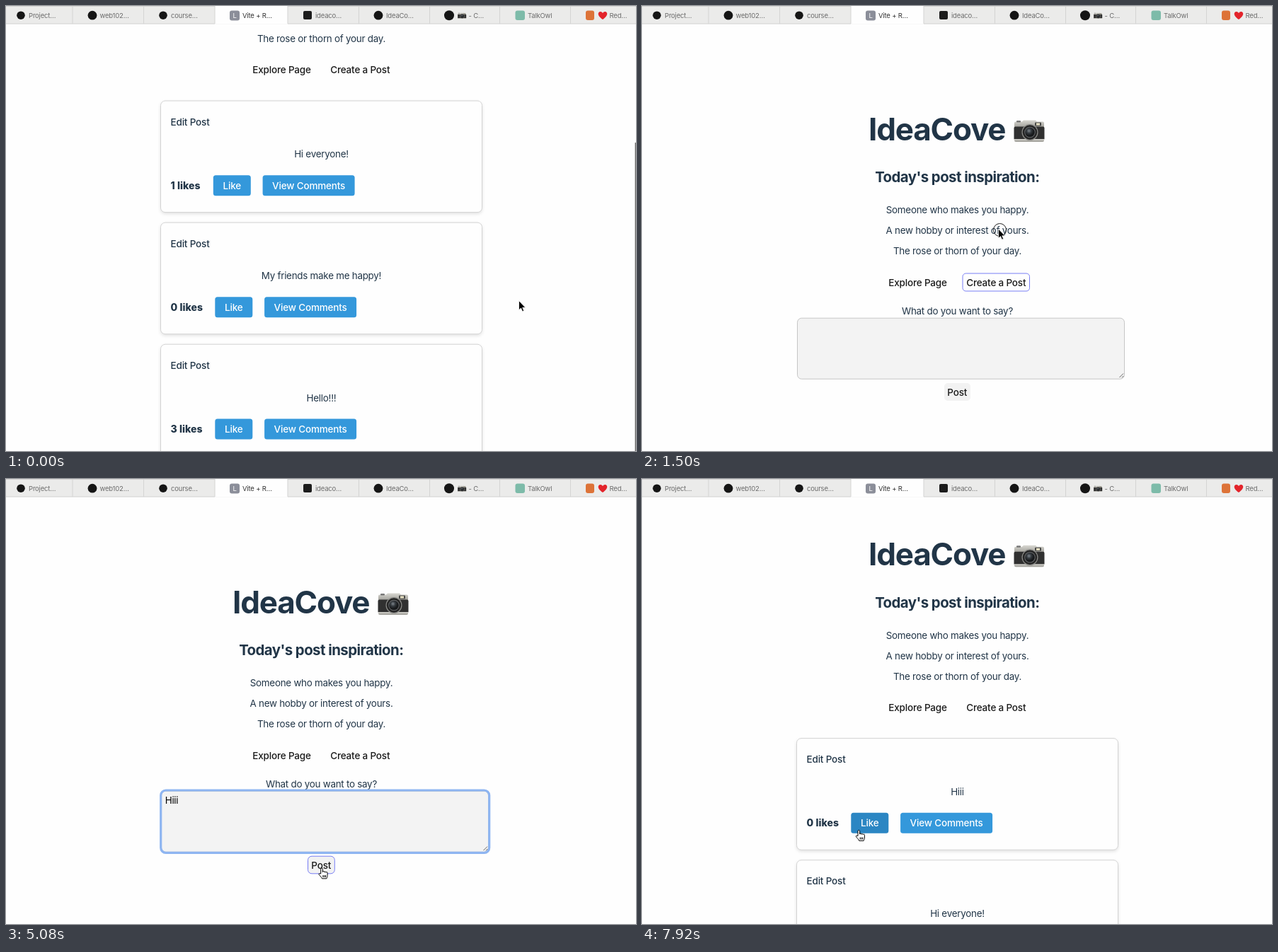
Recreate the animation shown at these times as an HTML page. Size 890x629 px, loop 8000 ms.

```html
<!DOCTYPE html>
<html lang="en">
<head>
<meta charset="utf-8">
<title>Post board</title>
<style>
  html, body { margin: 0; width: 100%; height: 100%; overflow: hidden; background: #fefefe; }
  svg { display: block; width: 890px; height: 629px; }
  text { font: 400 13.4px Inter, "Liberation Sans", sans-serif; font-optical-sizing: none;
         letter-spacing: -.019em; fill: #213547; white-space: pre; }
  .mid { text-anchor: middle; }
  .h1 { font-size: 44px; font-weight: 700; letter-spacing: -.027em; }
  .h2 { font-size: 20.4px; font-weight: 700; letter-spacing: -.027em; }
  .btn { font-size: 13.5px; font-weight: 500; letter-spacing: -.013em; }
  .likes { font-size: 14px; font-weight: 800; letter-spacing: .006em; }
  .tab { font-size: 9.5px; letter-spacing: -.02em; fill: #6c6c6c; }
  .dark { fill: #1a1a1a; }
  .white { fill: #fff; }
  .card { fill: #fefefe; stroke: #d3d3d3; filter: drop-shadow(0 2px 2px rgba(0, 0, 0, .11)); }
  .blue { fill: #3498db; }
  .blue.hover { fill: #2b86c3; }
  .outline { fill: none; stroke: #777df4; }
</style>
</head>
<body>
<svg viewBox="0 0 890 629">
  <defs>
    <linearGradient id="steel" x2="0" y2="1">
      <stop offset="0" stop-color="#d8d7d1"/><stop offset="1" stop-color="#96958f"/>
    </linearGradient>
    <radialGradient id="glass" cx=".4" cy=".35">
      <stop offset="0" stop-color="#7d858c"/><stop offset=".5" stop-color="#34393e"/><stop offset="1" stop-color="#17191b"/>
    </radialGradient>
    <g id="camera">
      <path d="M1 5q0-2 2-2h9l2-2h17l2 2h8q2 0 2 2v8H1z" fill="url(#steel)"/>
      <rect x="4" y="1.5" width="6" height="2.5" rx="1" fill="#777"/>
      <rect x="30" y="4" width="9" height="5" rx="1" fill="#4a4a48"/>
      <rect x="32" y="5" width="5" height="3" fill="#e8e2c4"/>
      <rect x=".5" y="10" width="43" height="19" rx="2" fill="#303030"/>
      <path d="M1 27.5h42v2q0 2-2 2H3q-2 0-2-2z" fill="url(#steel)"/>
      <circle cx="23" cy="18" r="11.5" fill="#8b8b88"/>
      <circle cx="23" cy="18" r="10.3" fill="#242424"/>
      <circle cx="23" cy="18" r="7.8" fill="#66686a"/>
      <circle cx="23" cy="18" r="6.8" fill="url(#glass)"/>
    </g>
  </defs>

  <rect width="890" height="629" fill="#fefefe"/>

  <g id="head">
    <text class="h1" x="320" y="122.3">IdeaCove</text>
    <use href="#camera" x="525" y="92.8"/>
    <text class="h2 mid" x="445.3" y="181.5">Today's post inspiration:</text>
    <text class="mid" x="445.5" y="225.7">Someone who makes you happy.</text>
    <text class="mid" x="445.5" y="254.7">A new hobby or interest of yours.</text>
    <text class="mid" x="445.5" y="283.7">The rose or thorn of your day.</text>
    <text class="btn dark mid" x="389.5" y="328">Explore Page</text>
    <text class="btn dark mid" x="500.3" y="328">Create a Post</text>
    <rect id="navRing" class="outline" x="453" y="310.3" width="94.5" height="25" rx="4.5"/>
  </g>

  <g id="feed"></g>

  <g id="form">
    <text class="mid" x="445.5" y="435.6">What do you want to say?</text>
    <rect x="219.5" y="441.2" width="462" height="86" rx="6" fill="#f3f3f3" stroke="#c6c6c6"/>
    <rect id="focus" x="218.7" y="440" width="464" height="88.3" rx="7" fill="none" stroke="#8eb5f1" stroke-width="3.2"/>
    <path d="M674.5 525l5.5-5.5M678 525.3l2.3-2.3" stroke="#555" stroke-width=".9"/>
    <text id="typed" x="224.7" y="458.8" style="fill:#000"></text>
    <path id="spell" d="M225.5 461h19" stroke="#e8453c" stroke-width="1.2" stroke-dasharray="1.5 1.1"/>
    <rect id="caret" y="446.5" width="1" height="14.5"/>
    <rect x="427" y="533" width="37" height="25" rx="5" fill="#f2f2f2"/>
    <rect id="postRing" class="outline" x="426.5" y="533.2" width="37.8" height="24.6" rx="5.5"/>
    <text class="btn dark mid" x="445.3" y="550.7">Post</text>
  </g>

  <rect id="thumb" x="888.6" width="1.4" height="437" fill="#6a6a6a"/>

  <g id="tabs">
    <rect width="890" height="25.5" fill="#ebebea"/>
    <rect x="295" width="103" height="25.5" fill="#fefefe"/>
    <path d="M0 .5h295M398 .5h492M0 25h295M398 25h492" stroke="#d4d4d3"/>
    <rect x="316" y="6.5" width="14" height="14" rx="3" fill="#8b8e99"/>
    <text class="tab mid white" x="323" y="17">L</text>
    <rect x="420" y="7" width="12" height="12" rx="2" fill="#1c1c1c"/>
    <rect x="719.5" y="6.5" width="13.5" height="13.5" rx="3" fill="#7dbba9"/>
    <rect x="819" y="6.5" width="12" height="13.5" rx="3" fill="#dd7338"/>
    <use href="#camera" transform="translate(638 9.3) scale(.28)"/>
    <path d="M843 19c-9-6-6.5-11-3.3-11q2.3 0 3.3 2 1-2 3.3-2c3.2 0 5.7 5-3.3 11z" fill="#e3242b"/>
  </g>

  <circle id="click" cx="505.5" cy="316.5" r="9" fill="none" stroke="#222"/>
  <path id="arrow" d="M0 0V13.3L3 10.5 5 15.2 7.2 14.3 5.2 9.8H9.3Z" stroke="#fff" stroke-width=".8"/>
  <g id="hand">
    <path transform="translate(-4.8 -1)" fill="#fff" stroke="#000" stroke-linejoin="round"
      d="M3.5 9V2.2a1.3 1.3 0 0 1 2.6 0V6.5a1.2 1.2 0 0 1 2.4.3 1.2 1.2 0 0 1 2.3.4 1.1 1.1 0 0 1 2.1.6V11.5c0 2-.8 2.8-1.2 4.3H5.2C4.6 13.8 2.6 12.3 1 10.2c-.8-1.2.6-2.2 1.6-1.4zM6.7 11v3M8.6 11v3M10.4 11v3"/>
  </g>
</svg>

<script>
const LOOP = 8000, STEP = 149.3;
const $ = id => document.getElementById(id);

function add(parent, tag, attrs, text) {
  const el = document.createElementNS('http://www.w3.org/2000/svg', tag);
  for (const key in attrs) el.setAttribute(key, attrs[key]);
  if (text) el.textContent = text;
  parent.append(el);
  return el;
}

// Tab bar
for (const x of [94, 194.5, 295, 398, 498.5, 598.5, 697.5, 797.5])
  add($('tabs'), 'path', { d: `M${x} 0v25`, stroke: '#d4d4d3' });
for (const [x, r] of [[21, 5.8], [122, 6.4], [222, 5.8], [526, 6.4], [626, 7]])
  add($('tabs'), 'circle', { cx: x, cy: 13.2, r, fill: '#151515' });
for (const [x, label] of [[32, 'Project…'], [132.5, 'web102…'], [233, 'course…'], [334, 'Vite + R…'],
    [437, 'ideaco…'], [537, 'IdeaCo…'], [653.5, '- C…'], [737, 'TalkOwl'], [852.5, 'Red…']])
  add($('tabs'), 'text', { class: 'tab', x, y: 16.7, style: x === 334 ? 'fill:#333' : '' }, label);

// Post cards; the newest sits one slot above the others
const cards = [['Hiii', 0], ['Hi everyone!', 1], ['My friends make me happy!', 0], ['Hello!!!', 3]]
  .map(([message, likes], i) => {
    const card = add($('feed'), 'g', { transform: `translate(0 ${366.6 + (i - 1) * 172.1})` });
    const x = likes === 1 ? 292.8 : 295.3;
    const button = (left, width, label) => {
      const rect = add(card, 'rect', { class: 'blue', x: left, y: 105.2, width, height: 29, rx: 3.5 });
      add(card, 'text', { class: 'btn white mid', x: left + width / 2, y: 124.8 }, label);
      return rect;
    };
    add(card, 'rect', { class: 'card', x: 218.5, y: 0, width: 454, height: 157.6, rx: 6.5 });
    add(card, 'text', { class: 'btn', x: 232.5, y: 34.6 }, 'Edit Post');
    add(card, 'text', { class: 'mid', x: 445.5, y: 80.4 }, message);
    add(card, 'text', { class: 'likes', x: 232.5, y: 124.9 }, likes + ' likes');
    return { card, like: button(x, 53, 'Like'), view: button(x + 69.8, 130, 'View Comments') };
  });

// Pointer tip: step, x, y
const path = [[0, 724.5, 416.5], [4, 662, 394.5], [7, 503.5, 315], [10, 503.5, 315], [16, 446.3, 453.5],
  [31, 446.3, 453.5], [34, 446, 550], [39, 446, 552], [40, 518.3, 486.5], [45, 556, 471.5],
  [50, 556, 471.5], [53, 306.3, 496.5]];
const scrolls = [232.6, 205, 135, 50, -1.8, -1, -.4, 0];

function pointer(n) {
  const i = Math.max(1, path.findIndex(p => p[0] >= n));
  const [a, ax, ay] = path[i - 1], [b, bx, by] = path[i];
  const k = (n - a) / (b - a);
  return [ax + (bx - ax) * k, ay + (by - ay) * k];
}

const within = (n, from, to) => n >= from && n < to;
const show = (el, on) => { el.style.display = on ? '' : 'none'; };
const shift = (el, x, y) => el.setAttribute('transform', `translate(${x} ${y})`);

function draw(n) {
  const form = within(n, 10, 42), fresh = n >= 42;
  const scroll = scrolls[Math.min(n, 7)];
  shift($('head'), 0, form ? 67.7 : -scroll);
  shift($('feed'), 0, fresh ? 172.1 : -scroll);
  show($('feed'), !form);
  show($('form'), form);
  show(cards[0].card, fresh);
  show($('navRing'), within(n, 7, 11));
  show($('thumb'), n < 10);
  $('thumb').setAttribute('y', 28 + Math.max(0, scroll) * .71);

  const count = n < 25 ? 0 : n < 27 ? 1 : Math.min(4, n - 25);
  $('typed').textContent = 'Hiii'.slice(0, count);
  $('caret').setAttribute('x', 225 + (count && form ? $('typed').getComputedTextLength() : 0));
  show($('focus'), within(n, 16, 36));
  show($('caret'), within(n, 16, 20) || within(n, 23, 34));
  show($('spell'), n >= 36);
  show($('postRing'), within(n, 34, 42));

  cards[0].view.classList.toggle('hover', within(n, 51, 53));
  cards[0].like.classList.toggle('hover', n >= 53);

  const hand = within(n, 7, 10) || within(n, 14, 42) || n >= 51;
  const [x, y] = pointer(n);
  show($('hand'), hand);
  show($('arrow'), !hand);
  show($('click'), n === 10);
  shift($(hand ? 'hand' : 'arrow'), x, y);
}

let last = -1;
const start = performance.now();
function tick() {
  const t = (performance.now() - start) % LOOP;
  const n = Math.min(53, Math.floor((t + 4) / STEP));
  if (n !== last) draw(last = n);
  requestAnimationFrame(tick);
}
tick();
</script>
</body>
</html>
```
